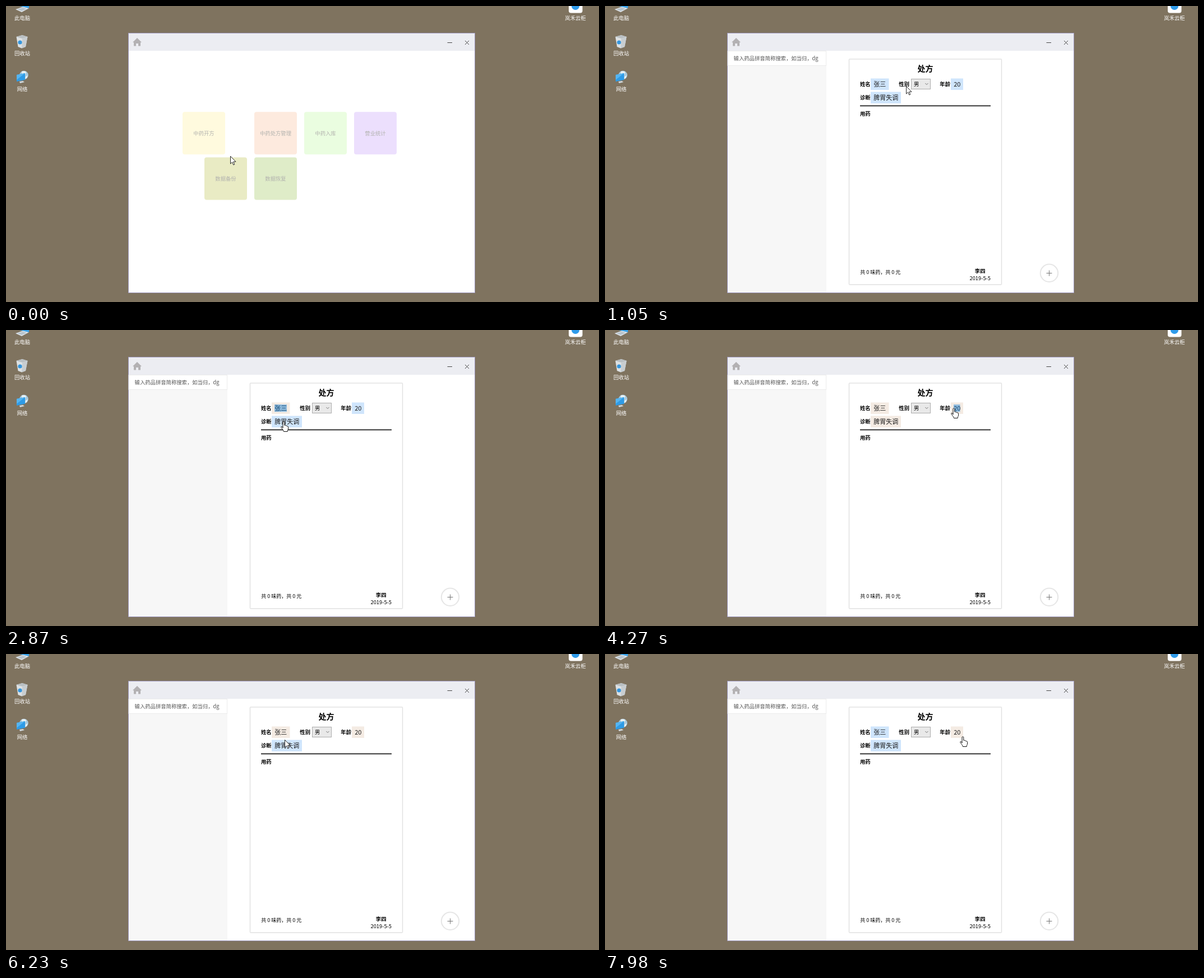
Animation, 1058 px wide and 529 px high, one loop 8000 ms. Source, as an HTML page:

```html
<!DOCTYPE html>
<html lang="zh-CN">
<head>
<meta charset="utf-8">
<title>处方</title>
<style>
html, body { margin: 0; width: 100%; height: 100%; overflow: hidden; background: #7f735f; }
svg { display: block; width: 100vw; height: 100vh; font: 9.33px "Noto Sans CJK SC", "Noto Sans CJK", sans-serif; }
.mid { text-anchor: middle; }
.desk { fill: #fff; text-anchor: middle; }
.bold { font-weight: 700; }
.entry { font-size: 11px; fill: #1c1c1c; }
.sel { fill: rgba(0, 120, 215, .42); }
.line { fill: none; stroke: #444; }
.thin { fill: none; stroke: #777; }
</style>
</head>
<body>
<svg viewBox="0 0 1058 529" xmlns="http://www.w3.org/2000/svg">
  <rect width="1058" height="529" fill="#7f735f"/>

  <!-- desktop -->
  <g>
    <path d="M17 6 31 1 41 4 28 11Z" fill="#dfe5ea"/>
    <path d="M24 0H41V4L28 1Z" fill="#3ba3ea"/>
    <path d="M20 6 30 3 37 5 28 9Z" fill="#b7c3cc"/>
    <text class="desk" x="29" y="24.5">此电脑</text>

    <path d="M18.5 55 29 52 38.5 55 35 73 28 75.5 21.5 73Z" fill="#dde1e3"/>
    <path d="M18.5 55 29 52 38.5 55 29 58Z" fill="#b9bfc2"/>
    <path d="M29 58 38.5 55 35 73 28 75.5Z" fill="#c8cdd0"/>
    <circle cx="25" cy="65" r="3.6" fill="#3596dd"/>
    <text class="desk" x="29" y="88">回收站</text>

    <circle cx="32" cy="123.5" r="7.8" fill="#a9c9dc"/>
    <path d="M28 117q5-2 8 1l-2 5-5 1ZM35 126l4-2-2 5-3 1Z" fill="#e9f1f4"/>
    <path d="M19 123 34 120V132L19 135Z" fill="#2e9be6"/>
    <path d="M19 123 34 120 19 132Z" fill="#55b5f2"/>
    <path d="M24 135 30 134 33 136 25 138Z" fill="#d3dade"/>
    <text class="desk" x="29" y="151.5">网络</text>

    <rect x="1004" y="-12" width="24.5" height="24.5" rx="4" fill="#fff"/>
    <circle cx="1016" cy="0" r="7" fill="#2f9bea"/>
    <text class="desk" x="1016" y="24.5">岚禾云柜</text>
  </g>

  <!-- window -->
  <rect x="218.5" y="48.5" width="618" height="464" fill="#fff" stroke="#a39ec4"/>
  <rect x="219" y="49" width="617" height="31" fill="#ecedf2"/>
  <path d="M234 57 242 65H240V71.5H236V67H232V71.5H228V65H226Z" fill="#b3b1b3"/>
  <path class="line" d="M787.5 65.5H796M819 62 826 69M826 62 819 69"/>

  <g id="home"></g>

  <g id="form">
    <rect x="219" y="80" width="176" height="432" fill="#f7f7f7"/>
    <rect x="219" y="80.5" width="175.5" height="26" fill="#fff" stroke="#ebebeb"/>
    <text x="229.6" y="97" fill="#555">输入药品拼音简称搜索，如当归，dg</text>

    <rect x="434.5" y="94" width="274" height="405" rx="2" fill="#f1f1f1"/>
    <rect x="435.7" y="95" width="271.6" height="402.8" rx="1" fill="#fff" stroke="#dcdcdc"/>
    <text class="mid bold" x="571.5" y="117.2" font-size="14">处方</text>
    <g class="bold">
      <text x="455" y="143.2">姓名</text>
      <text x="524.3" y="143.2">性别</text>
      <text x="597.3" y="143.2">年龄</text>
      <text x="455" y="167.2">诊断</text>
      <text x="455" y="195.8">用药</text>
      <text x="659.8" y="476.8">李四</text>
    </g>
    <rect x="546.5" y="130.5" width="34" height="18" fill="#e9e9e9" stroke="#adadad"/>
    <text x="551" y="143.2">男</text>
    <path class="thin" d="m571.3 138 2.6 2.6 2.6-2.6"/>
    <rect x="455" y="177.5" width="233" height="1.8" fill="#222"/>
    <text x="455.3" y="479.3" font-size="9">共 0 味药，共 0 元</text>
    <text x="688" y="490" text-anchor="end">2019-5-5</text>
    <g id="fields"></g>

    <circle cx="792.5" cy="477.3" r="15.7" fill="#fff" stroke="#e6e6e6" stroke-width="2"/>
    <path class="thin" d="M787.5 477.5H797.5M792.5 472.5V482.5"/>
  </g>

  <g id="cursor" fill="#fff" stroke="#111" stroke-linejoin="round">
    <path id="arrow" stroke-width=".9" d="M.5.5V14l3.1-3 2.2 5 2-.9-2.1-4.8H10Z"/>
    <path id="hand" transform="translate(-5 -1)" d="M4 12V2.2a1.4 1.4 0 0 1 2.8 0V7.2q2.2-.4 2.4.8 2-.4 2.3.9 2.1-.3 2.1 1.6V13c0 2.2-1.4 2.8-1.4 5.5H5.5C5.3 16 1.5 12.5.8 10.8c-.5-1.3 1-1.9 1.9-.9Z"/>
  </g>
</svg>
<script>
const LOOP = 8000, TICK = 70;
const CARET_DELAY = 70, COMMIT_DELAY = 630, ROW = 20.5;
const $ = id => document.getElementById(id);
const clamp = v => Math.max(0, Math.min(1, v));
const show = (el, on) => { el.style.visibility = on ? 'visible' : 'hidden'; };

function add(parent, tag, attrs, text = '') {
  const el = document.createElementNS('http://www.w3.org/2000/svg', tag);
  for (const key in attrs) el.setAttribute(key, attrs[key]);
  el.textContent = text;
  return parent.appendChild(el);
}

// home tiles on a grid of four columns
const tiles = [
  ['中药开方', '#fffade'], ['中药处方管理', '#fdeade'], ['中药入库', '#eafde0'],
  ['营业统计', '#ecdffd'], ['数据备份', '#e9ebc4'], ['数据恢复', '#dfecc8']
].map(([label, fill], i) => {
  const x = 354 + 89 * (i % 4), y = 189.2 + 81.2 * Math.floor(i / 4);
  const g = add($('home'), 'g', {});
  add(g, 'rect', { x, y, width: 76, height: 76, rx: 4, fill });
  add(g, 'text', { class: 'mid', x: x + 38, y: y + 41.8, fill: '#b2b2ae' }, label);
  return g;
});

function makeField(text, x, y, w) {
  const g = $('fields'), inner = { y: y + 3.7, height: 13 };
  const bg = add(g, 'rect', { x, y, width: w, height: ROW });
  add(g, 'text', { class: 'entry', x: x + 5.2, y: y + 14.5 }, text);
  const mark = add(g, 'rect', { class: 'sel', x: x + 5, width: w - 10.5, ...inner });
  const caret = add(g, 'rect', { x: x + w / 2 - .2, width: 1, ...inner });
  const hit = (px, py) => px >= x && px <= x + w && py >= y && py <= y + ROW;
  return { bg, mark, caret, hit };
}
const name = makeField('张三', 474, 129.5, 32.5);
const diagnosis = makeField('脾胃失调', 474, 153.5, 54);
const age = makeField('20', 617, 129.5, 22);
const fields = [name, diagnosis, age];

// a first click opens a field with its text selected; a second one sets the caret, then commits
const clicks = [[1820, name], [3360, diagnosis], [4270, age], [5040, diagnosis], [6440, name]];

function drawField(f, t) {
  const past = clicks.filter(c => c[0] <= t);
  const mine = past.filter(c => c[1] === f);
  const focused = mine.length > 0 && past[past.length - 1][1] === f;
  const again = mine.length > 1;
  const since = again ? t - mine[1][0] : 0;
  const open = mine.length > 0 && since < COMMIT_DELAY;
  f.bg.setAttribute('fill', open ? '#f4ebe3' : '#cfe5fc');
  show(f.mark, focused && since < CARET_DELAY);
  show(f.caret, focused && open && since >= CARET_DELAY);
}

// pointer moves: start, end, goal x, goal y; it rests in between
const moves = [
  [770, 1050, 537, 143], [1050, 1190, 582, 151], [1190, 1540, 490, 139],
  [1820, 2030, 502, 159], [2520, 2870, 495, 164], [3360, 4060, 622, 140],
  [4270, 4760, 463, 171], [4760, 4970, 498, 160], [6090, 6370, 496, 146],
  [7280, 7420, 506, 108], [7490, 7700, 647, 141], [7770, 7980, 638, 148]
];

function pointerAt(t) {
  let x = 400, y = 268;
  for (const [from, to, goalX, goalY] of moves) {
    const k = clamp((t - from) / (to - from));
    x += (goalX - x) * k;
    y += (goalY - y) * k;
  }
  return [Math.round(x), Math.round(y)];
}

function draw(time) {
  const t = Math.floor(time / TICK) * TICK;

  // tiles leave one after another, one tick apart
  tiles.forEach((g, i) => {
    const dx = -39 * Math.max(0, t / TICK + 1 - i);
    g.setAttribute('transform', `translate(${dx} 0)`);
  });
  $('home').style.opacity = 1 - clamp(t / 210);
  const left = 1 - clamp((t - 210) / 630);
  $('form').style.opacity = 1 - left * left;

  fields.forEach(f => drawField(f, t));

  const [x, y] = pointerAt(t);
  const over = fields.some(f => f.hit(x, y));
  $('cursor').setAttribute('transform', `translate(${x} ${y})`);
  show($('hand'), over);
  show($('arrow'), !over);
}

const start = performance.now();
function frame() {
  draw((performance.now() - start) % LOOP);
  requestAnimationFrame(frame);
}
frame();
</script>
</body>
</html>
```
